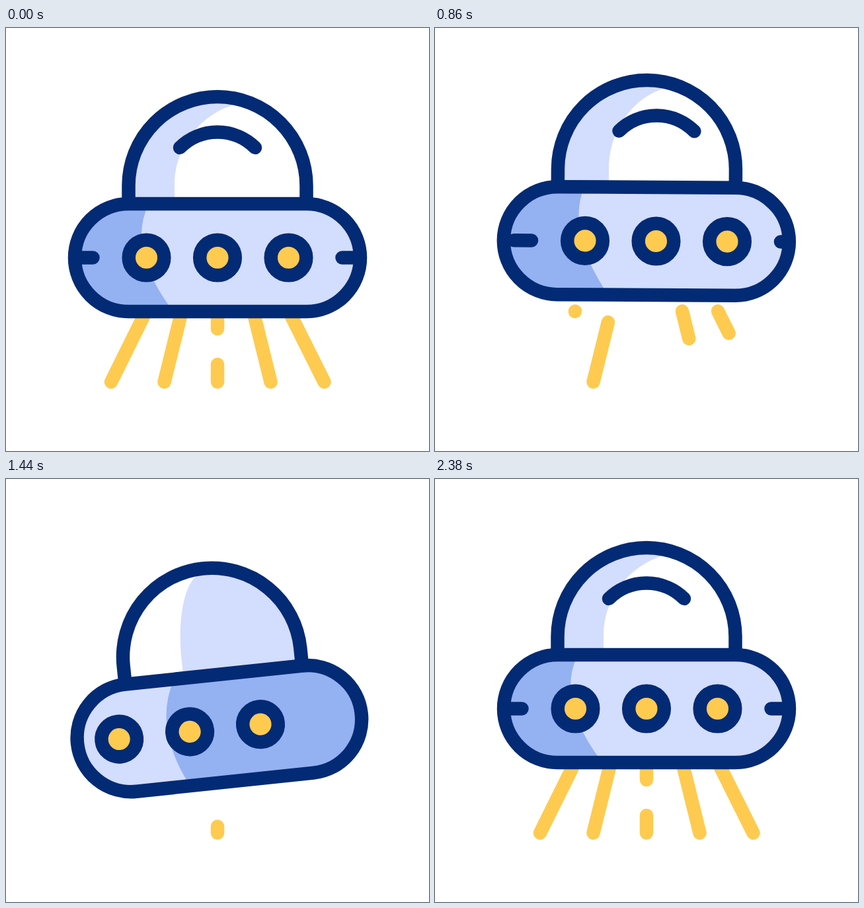
Write an HTML page that moves like this. It is 640x640 px and loops after 2.4 s.

```html
<!DOCTYPE html>
<html lang="en">
<head>
<meta charset="utf-8">
<title>Flying saucer</title>
<style>
  html, body { margin: 0; width: 100%; height: 100%; overflow: hidden; background: #fff; }
  svg { display: block; width: 100%; height: 100%; }
  .line { fill: none; stroke: #032a74; stroke-width: 20.5; stroke-linecap: round; }
  .dot { fill: #fecb50; stroke: #032a74; stroke-width: 20.5; }
  .ray { stroke: #fecb50; stroke-width: 20.5; stroke-linecap: round; }
  .pale { fill: #d3ddfd; }
  .deep { fill: #94b1f2; }
  .white { fill: #fff; }
</style>
</head>
<body>
<svg viewBox="0 0 640 640">
  <defs>
    <path id="dome" d="M-134.5 266V238.5A134.5 134.5 0 0 1 134.5 238.5V266"/>
    <rect id="hull" x="-216" y="266" width="432" height="163" rx="81.5"/>
    <clipPath id="inDome"><use href="#dome"/></clipPath>
    <clipPath id="inHull"><use href="#hull"/></clipPath>
    <g id="lamps">
      <circle class="dot" cx="-107.5" cy="347.5" r="26.8"/>
      <circle class="dot" cy="347.5" r="26.8"/>
      <circle class="dot" cx="107.5" cy="347.5" r="26.8"/>
    </g>
  </defs>
  <g id="rays"></g>
  <g id="ship">
    <use href="#dome" class="white"/>
    <g clip-path="url(#inDome)">
      <path id="domeLead" class="pale"/>
      <path id="domeTrail" class="white"/>
      <path id="gleam" class="line" d="M-57 181A81 81 0 0 1 57 181"/>
    </g>
    <use href="#dome" class="line" style="stroke-linecap:butt"/>
    <use href="#hull" class="pale"/>
    <g clip-path="url(#inHull)">
      <path id="hullLead" class="deep"/>
      <path id="hullTrail" class="pale"/>
      <g id="front">
        <use href="#lamps"/>
        <path class="line" d="M-215 347.5H-188.5M188.5 347.5H215"/>
      </g>
      <use id="back" href="#lamps"/>
    </g>
    <use href="#hull" class="line"/>
  </g>
</svg>
<script>
const LOOP = 2400, END = 2380, TURN = 1300;
const $ = id => document.getElementById(id);
const clamp = (v, a, b) => Math.min(b, Math.max(a, v));
const sine = p => (1 - Math.cos(Math.PI * p)) / 2;

// Solves a cubic-bezier(x1, 0, x2, 1) timing curve.
function bezier(x1, x2, p) {
  let lo = 0, hi = 1, s = 0.5;
  for (let i = 0; i < 24; i++) {
    s = (lo + hi) / 2;
    const x = 3 * (1 - s) * s * ((1 - s) * x1 + s * x2) + s ** 3;
    if (x < p) lo = s; else hi = s;
  }
  return s * s * (3 - 2 * s);
}

// Eased value through [time, value] stops.
function along(stops, t) {
  for (let i = 1; i < stops.length; i++) {
    const [t0, a] = stops[i - 1], [t1, b] = stops[i];
    if (t <= t1) return a + (b - a) * sine((t - t0) / (t1 - t0));
  }
  return stops[stops.length - 1][1];
}

const LIFT = [[0, 0], [600, -38.5], [1500, 31], [END, 0]];
const TILT = [[0, 0], [600, 1.7], [1560, -6.3], [END, 0]];

function spin(t) {
  if (t < 720) return -54 * sine(t / 720);
  return -54 + (TURN + 54) * bezier(0.161, 0.691, clamp((t - 720) / (END - 720), 0, 1));
}

// Area left of a curved edge on the dome.
function domeArea(e, rx) {
  const c = e + rx;
  return `M-900 300H${e}V238C${e} 168 ${c - 0.55 * rx} 111 ${c} 111V0H-900Z`;
}

// Area left of a curved edge on the hull.
const hullArea = (top, mid, low) =>
  `M-900 266H${top}Q${mid} 335 ${low} 429H-900Z`;

// Rays: x at top, x at bottom, then start and end of out, in, out, in.
const RAYS = [
  [212, 159, [340, 600, 860, 1120, 1160, 1420, 1840, 2100]],
  [266, 239.5, [20, 300, 590, 830, 830, 1030, 1620, 1880]],
  [320, 320, [360, 620, 1050, 1250, 1250, 1460, 1960, 2160], [[0, 0.248], [0.752, 1]]],
  [374, 400.5, [20, 300, 760, 1020, 1100, 1360, 1660, 1920]],
  [428, 481.5, [130, 390, 780, 1040, 1100, 1360, 1700, 1960]]
].map(([x0, x1, times, parts = [[0, 1]]]) => ({
  x0, x1, times,
  parts: parts.map(([a, b]) => {
    const el = document.createElementNS("http://www.w3.org/2000/svg", "line");
    el.setAttribute("class", "ray");
    $("rays").append(el);
    return { a, b, el };
  })
}));

// Visible stretch of a ray: it drains downwards, then fills from the top.
function stretch(k, t) {
  let range = [0, 1];
  for (let i = 0; i < k.length; i += 2) {
    if (t < k[i]) break;
    const p = clamp((t - k[i]) / (k[i + 1] - k[i]), 0, 1);
    range = i % 4 ? [0, p] : [p, 1];
  }
  return range;
}

function drawRays(t) {
  for (const { x0, x1, times, parts } of RAYS) {
    const [from, to] = stretch(times, t);
    for (const { a, b, el } of parts) {
      const p = Math.max(a, from), q = Math.min(b, to);
      el.style.display = q - p > 0.001 ? "" : "none";
      el.setAttribute("x1", x0 + (x1 - x0) * p);
      el.setAttribute("x2", x0 + (x1 - x0) * q);
      el.setAttribute("y1", 428.5 + 107 * p);
      el.setAttribute("y2", 428.5 + 107 * q);
    }
  }
}

function draw(t) {
  const x = spin(t), again = x > 1000;
  const u = again ? x - TURN : x, d = x - 607;
  const shift = (id, v) => $(id).setAttribute("transform", `translate(${v} 0)`);

  $("ship").setAttribute("transform",
    `translate(320 ${along(LIFT, t)}) rotate(${along(TILT, t)} 0 320)`);
  shift("front", u);
  shift("gleam", u);
  shift("back", x - TURN / 2);

  const lead = -65 + u * (u < 0 ? 0.76 : 0.52);
  const leadRx = clamp(125 - 1.29 * (lead + 65), -125, 125);
  $("domeLead").setAttribute("d", domeArea(lead, leadRx));
  const side = u * (u < 0 ? 0.87 : 0.65), mid = u * (u < 0 ? 1.3 : 1.1);
  $("hullLead").setAttribute("d", hullArea(-104 + side, -138 + mid, -67 + side));

  const trail = -45 + 0.52 * d;
  $("domeTrail").setAttribute("d", again ? "" : domeArea(trail, clamp(-trail, -125, 125)));
  $("hullTrail").setAttribute("d",
    again ? "" : hullArea(-59 + 0.65 * d, -98 + 1.1 * d, -52 + 0.65 * d));

  drawRays(t);
}

const begin = performance.now();
function tick(now) {
  draw(Math.max(0, now - begin) % LOOP);
  requestAnimationFrame(tick);
}
draw(0);
requestAnimationFrame(tick);
</script>
</body>
</html>
```
